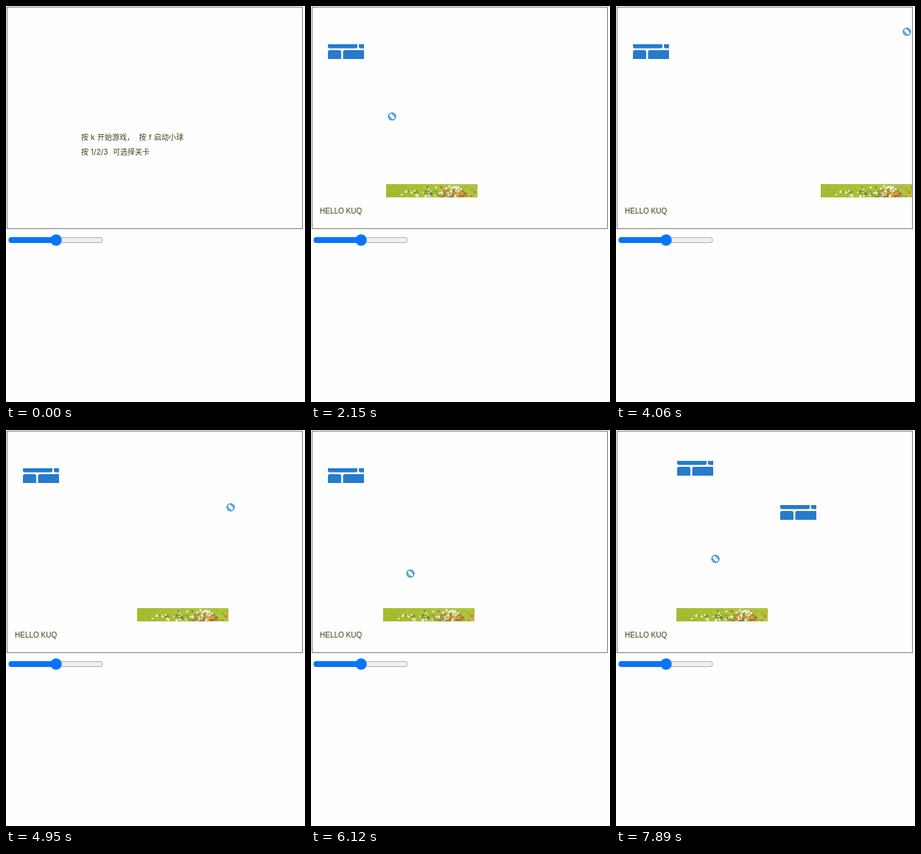
Write an HTML page with a canvas that moves like this. It is 406x538 px and loops after 8000 ms.

```html
<!DOCTYPE html>
<html lang="zh">
<head>
<meta charset="utf-8">
<style>
  html, body { margin: 0; width: 100%; height: 100%; overflow: hidden; background: #fefefe; }
  canvas { display: block; }
</style>
</head>
<body>
<canvas id="stage" width="406" height="538"></canvas>
<script>
const c = document.getElementById('stage').getContext('2d');
const LOOP = 8000, START = 500, FIRST_STEP = 2142, STEP = 147.2;
const INK = '#3f3f14', BLUE = '#267bcb', SLIDER = '#0a75fb';
const CJK = '10px "Noto Sans CJK SC", "Noto Sans CJK", sans-serif';
const LATIN = '10px Inter, sans-serif';
const SCORE = '10px "Liberation Sans", Arial, sans-serif';

// Ball bounces: game tick, centre x, centre y
const path = [[0, 90, 130], [21, 195, 235], [65, 415, 15], [67, 405, 5],
  [113, 175, 235], [147, 5, 65], [149, 15, 55], [173, 135, 175]];
// Paddle: screen step, left edge
const moves = [[-1, 102], [7, 182], [8, 262], [9, 278], [19, 178], [20, 98], [30, -2], [36, 82]];

let seed = 7;
const rnd = () => (seed = seed * 16807 % 2147483647) / 2147483647;
const dots = (n, x, y, w, h, size, colors) => Array.from({ length: n }, () => ({
  x: x + rnd() * w, y: y + rnd() * h, r: size * (.6 + rnd() * .6),
  color: colors[Math.floor(rnd() * colors.length)]
}));
const meadow = [
  ...dots(40, 0, 0, 124, 18, 2, ['#9fb52e', '#b4c53c', '#a3b436']),
  ...dots(34, 24, 9, 84, 9, 1.9, ['#7d9433', '#8d9b45', '#6f8338']),
  ...dots(20, 56, 3, 48, 7, 1.6, ['#788c42', '#e9ead2', '#f3f3e6']),
  ...dots(26, 24, 9, 74, 8, 1.6, ['#f4f2e4', '#e4e2c4', '#d9d7a8']),
  ...dots(17, 76, 8, 46, 10, 1.7, ['#e8763c', '#dd5f38', '#f0a268']),
  ...dots(5, 18, 13, 30, 4, 1.4, ['#e08a48', '#ead98e'])
];

function rect(x, y, w, h, color, radii = 0) {
  c.fillStyle = color;
  c.beginPath();
  c.roundRect(x, y, w, h, radii);
  c.fill();
}

function disc(x, y, r, color) {
  c.fillStyle = color;
  c.beginPath();
  c.arc(x, y, r, 0, 7);
  c.fill();
}

function text(str, x, y, font) {
  c.font = font;
  c.fillStyle = INK;
  c.fillText(str, x, y);
}

function title() {
  text('按', 102, 182, CJK);
  text('k', 115, 182, LATIN);
  text('开始游戏，', 124, 182, CJK);
  text('按', 180.6, 182, CJK);
  text('f', 194, 182, LATIN);
  text('启动小球', 201, 182, CJK);
  text('按', 102, 202, CJK);
  text('1/2/3', 115, 202, LATIN);
  text('可选择关卡', 145, 202, CJK);
}

function slider() {
  rect(3.5, 314, 128, 8, '#b2b2b2', 4);
  rect(4.5, 315, 126, 6, '#efefef', 3);
  rect(3.5, 314, 66, 8, SLIDER, 4);
  disc(68, 318, 7.7, SLIDER);
}

function block(x, y) {
  rect(x + 1, y, 40, 5.5, BLUE, [0, 0, 2.5, 2.5]);
  rect(x + 43, y, 7, 5.5, BLUE, [0, 0, 0, 2.5]);
  rect(x + 1, y + 8, 18, 12, BLUE, [2.5, 2.5, 0, 0]);
  rect(x + 21.5, y + 8, 28.5, 12, BLUE, [2.5, 1, 0, 0]);
}

function ball(x, y) {
  c.save();
  c.translate(x, y);
  c.rotate(Math.PI / 4);
  disc(0, 0, 5.6, '#2f8dd3');
  rect(-4.4, -2.2, 8.8, 4.4, '#fefefe', 2);
  c.fillStyle = '#b5dbf2';
  c.fillRect(-2, -4.2, 4, .8);
  c.fillRect(-2, 3.4, 4, .8);
  c.restore();
}

function paddle(x) {
  c.save();
  c.beginPath();
  c.rect(x, 242, 124, 18);
  c.clip();
  c.translate(x, 242);
  const g = c.createLinearGradient(0, 0, 124, 0);
  g.addColorStop(0, '#a6bb2e');
  g.addColorStop(1, '#b0c440');
  rect(0, 0, 124, 18, g);
  for (const d of meadow) disc(d.x, d.y, d.r, d.color);
  c.restore();
}

function ballAt(tick) {
  const i = Math.max(1, path.findIndex(p => p[0] >= tick));
  const [s0, x0, y0] = path[i - 1], [s1, x1, y1] = path[i];
  const f = (tick - s0) / (s1 - s0);
  return [x0 + (x1 - x0) * f, y0 + (y1 - y0) * f];
}

function game(t) {
  const k = Math.min(39, Math.floor((t - FIRST_STEP) / STEP));
  const tick = k < 0 ? 0 : Math.floor(k < 15 ? 4.001 + 4.4 * k : 70.001 + (k - 15) * 103 / 24);
  c.save();
  c.beginPath();
  c.rect(2, 2, 400, 300);
  c.clip();
  if (tick < 149) block(22, 52);
  else {
    block(82, 42);
    block(222, 102);
  }
  paddle(moves.filter(m => m[0] <= Math.max(k, -1)).pop()[1]);
  ball(...ballAt(Math.min(tick, 173)));
  text('HELLO KUQ', 12, 282, SCORE);
  c.restore();
}

function draw(now) {
  const t = now % LOOP;
  rect(0, 0, 406, 538, '#fefefe');
  c.strokeStyle = '#7c7c7c';
  c.lineWidth = 1;
  c.strokeRect(1.5, 1.5, 401, 301);
  slider();
  if (t < START) title();
  else game(t);
}

const begin = performance.now();
function loop() {
  draw(performance.now() - begin);
  requestAnimationFrame(loop);
}
loop();
</script>
</body>
</html>
```
